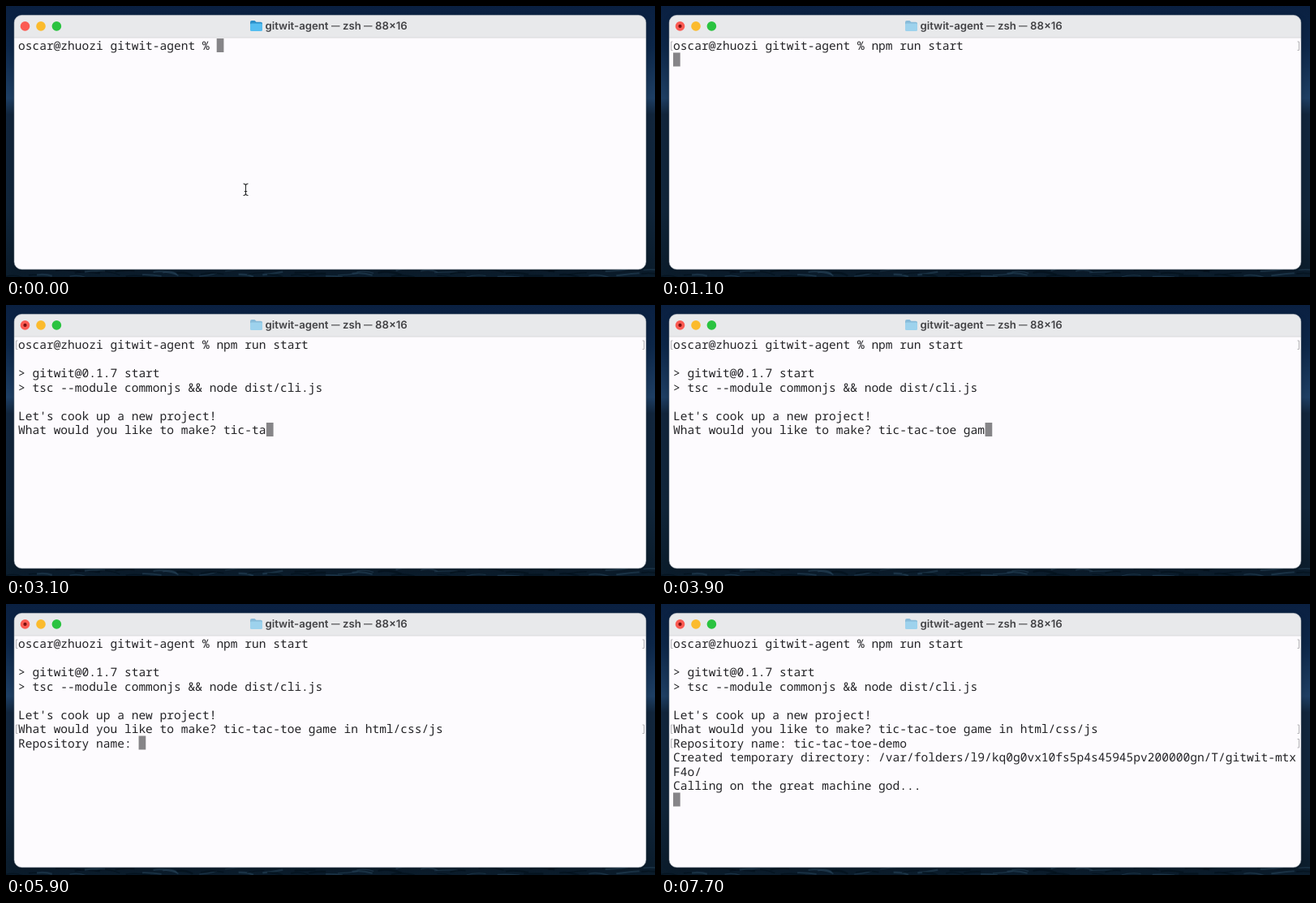
An HTML page for the animation above (8000 ms loop, 800 px wide and 334 px high).

```html
<!DOCTYPE html>
<html lang="en">
<head>
<meta charset="utf-8">
<title>Terminal session</title>
<style>
  html, body { margin: 0; width: 100%; height: 100%; overflow: hidden; background: #0a1829; }
  svg { display: block; }
  text { white-space: pre; text-rendering: geometricPrecision; }
  #rows text { font: 14.56px "Noto Sans Mono", "DejaVu Sans Mono", monospace; fill: #232326; }
  #title text { font: 600 13.2px Inter, "Open Sans", sans-serif; fill: #424245; }
  #title .dash { font-size: 10.5px; }
</style>
</head>
<body>
<svg width="800" height="334" viewBox="0 0 800 334">
  <defs>
    <linearGradient id="sky" x2="0" y2="1">
      <stop offset="0" stop-color="#0a2041"/>
      <stop offset=".15" stop-color="#0d2749"/>
      <stop offset=".34" stop-color="#1f4065"/>
      <stop offset=".4" stop-color="#12263d"/>
      <stop offset=".75" stop-color="#11263b"/>
      <stop offset="1" stop-color="#0b1c2b"/>
    </linearGradient>
    <filter id="blur" x="-5%" y="-10%" width="110%" height="120%"><feGaussianBlur stdDeviation="5"/></filter>
    <clipPath id="frame"><rect x="10" y="11.3" width="779" height="313.4" rx="9.5"/></clipPath>
  </defs>

  <rect width="800" height="334" fill="url(#sky)"/>
  <g id="ridges" fill="none"></g>
  <rect x="10" y="15" width="779" height="310" rx="10" fill="#000" opacity=".25" filter="url(#blur)"/>
  <g clip-path="url(#frame)">
    <rect x="10" y="11" width="779" height="314" fill="#fdfbfe"/>
    <rect x="10" y="11" width="779" height="28" fill="#e8e9eb"/>
    <rect x="10" y="38.5" width="779" height="1" fill="#d9d9dc"/>
  </g>
  <rect x="10" y="11.3" width="779" height="313.4" rx="9.5" fill="none" stroke="#7c8794" stroke-opacity=".55"/>

  <circle cx="23.5" cy="24.9" r="5.8" fill="#fb5b53"/>
  <circle cx="43" cy="24.9" r="5.8" fill="#fbbb2d"/>
  <circle cx="62.4" cy="24.9" r="5.8" fill="#2ac340"/>
  <circle id="busy" cx="23.5" cy="24.9" r="2.1" fill="#7a0f10"/>

  <g id="folder">
    <path d="M301 20q0-2 2-2h3.500l2 1.700h5.500q2 0 2 2V29h-15z" fill="#2b8fc9"/>
    <rect x="301" y="21.500" width="15" height="9.500" rx="1.500" fill="#55bdf0"/>
  </g>
  <g id="title">
    <text x="319.5" y="29">gitwit-agent</text>
    <text class="dash" x="401" y="28">—</text>
    <text x="415" y="29">zsh</text>
    <text class="dash" x="441" y="28">—</text>
    <text x="455" y="29">88×16</text>
  </g>

  <rect id="cursor" width="8.7" height="17" fill="#868588"/>
  <g id="rows"></g>
  <g id="marks" fill="none" stroke="#b2b1b5"></g>
  <path id="pointer" d="M292.500 219q3 0 3 2.500v9.500q0 2.500-3 2.500M298.500 219q-3 0-3 2.500m0 9.500q0 2.500 3 2.500M293.800 228.500h3.400"
        fill="none" stroke="#2a2a2c" stroke-width="1.1"/>
</svg>
<script>
const LOOP = 8000, LEFT = 15, TOP = 40, CELL = 8.74, LINE = 17.5;
const $ = id => document.getElementById(id);
const make = (parent, tag, attrs) => {
  const node = document.createElementNS("http://www.w3.org/2000/svg", tag);
  for (const key in attrs) node.setAttribute(key, attrs[key]);
  return parent.appendChild(node);
};

// Faint slopes of the wallpaper, seen below the window.
let seed = 7;
const random = () => (seed = seed * 16807 % 2147483647) / 2147483647;
for (let x = 0; x < 800; x += 16) {
  make($("ridges"), "path", {
    d: `M${x + random() * 16} ${325 + random() * 9}q12 ${random() * 4 - 4} ${18 + random() * 14} ${random() * 8 - 4}`,
    stroke: random() < .5 ? "#264258" : "#04101b",
    "stroke-width": 1 + random() * 1.5,
    opacity: .6
  });
}

// Each row: line number, time shown, fixed text, typed text,
// key times as [time, characters], time of Enter.
const script = [
  { row: 0, at: 0, text: "oscar@zhuozi gitwit-agent % ", typed: "npm run start",
    keys: [[0, 0], [100, 1], [1000, 13]], enter: 1100 },
  { row: 2, at: 1500, text: "> gitwit@0.1.7 start" },
  { row: 3, at: 1500, text: "> tsc --module commonjs && node dist/cli.js" },
  { row: 5, at: 2100, text: "Let's cook up a new project!" },
  { row: 6, at: 2100, text: "What would you like to make? ", typed: "tic-tac-toe game in html/css/js",
    keys: [[2500, 0], [3100, 6], [4200, 19], [4700, 25], [4800, 25], [5400, 31]], enter: 5500 },
  { row: 7, at: 5500, text: "Repository name: ", typed: "tic-tac-toe-demo",
    keys: [[5900, 0], [6200, 4], [6300, 4], [6800, 10], [6900, 11], [7500, 16]], enter: 7700 },
  { row: 8, at: 7700, text: "Created temporary directory: /var/folders/l9/kq0g0vx10fs5p4s45945pv200000gn/T/gitwit-mtx" },
  { row: 9, at: 7700, text: "F4o/" },
  { row: 10, at: 7700, text: "Calling on the great machine god..." }
];

for (const line of script) {
  const y = TOP + line.row * LINE;
  line.node = make($("rows"), "text", { x: LEFT, y: y + 14.4 });
  if (line.enter) line.mark = make($("marks"), "path", {
    d: `M14.500 ${y + 4}h-2v10.500h2M784.500 ${y + 4}h2v10.500h-2`
  });
}

function typedCount(keys, t) {
  let [t0, n0] = keys[0];
  for (const [t1, n1] of keys) {
    if (t < t1) return t < t0 ? n0 : Math.floor(n0 + (n1 - n0) * (t - t0) / (t1 - t0) + 1e-6);
    [t0, n0] = [t1, n1];
  }
  return n0;
}

const show = (node, on) => node.setAttribute("visibility", on ? "visible" : "hidden");

function draw(now) {
  const t = Math.floor(now % LOOP / 100) * 100;
  let row = 0, col = 0;
  for (const line of script) {
    const on = t >= line.at;
    const done = line.enter && t >= line.enter;
    const text = line.text + (line.typed ? line.typed.slice(0, typedCount(line.keys, t)) : "");
    if (line.node.textContent !== text) line.node.textContent = text;
    show(line.node, on);
    if (line.mark) show(line.mark, done);
    if (on) {
      const waiting = line.typed && !done;
      row = waiting ? line.row : line.row + 1;
      col = waiting ? text.length : 0;
    }
  }
  $("cursor").setAttribute("x", LEFT + col * CELL);
  $("cursor").setAttribute("y", TOP + row * LINE);
  const running = t >= script[0].enter;
  show($("busy"), running);
  $("folder").setAttribute("opacity", running ? .5 : 1);
  show($("pointer"), t < 100);
}

const start = performance.now();
function tick() {
  draw(performance.now() - start);
  requestAnimationFrame(tick);
}
tick();
</script>
</body>
</html>
```
